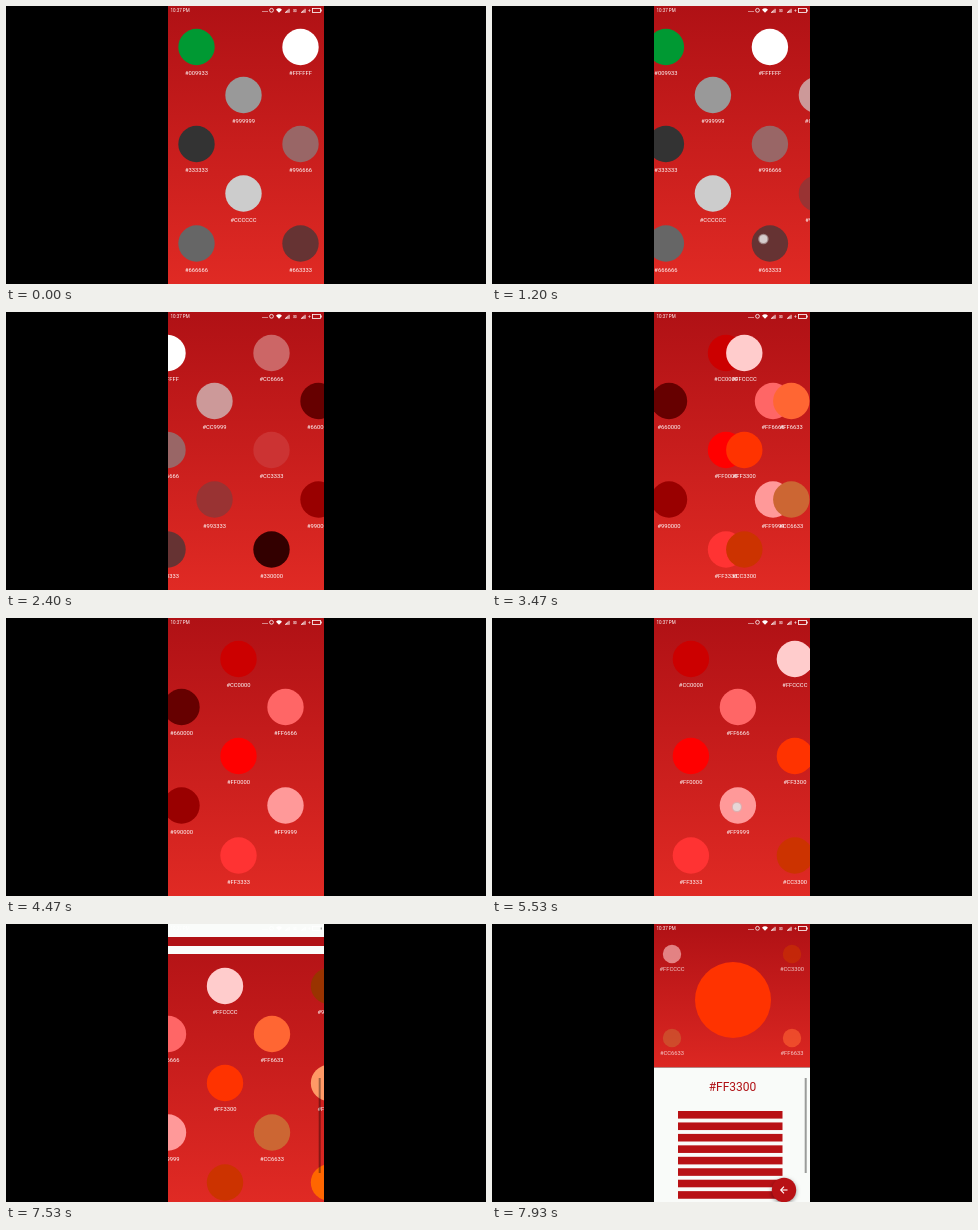
Recreate the animation shown at these times as an HTML page with a canvas. Size 480 px wide and 278 px high, loop 8000 ms.

```html
<!DOCTYPE html>
<html lang="en">
<head>
<meta charset="utf-8">
<title>Colour palette</title>
<style>
  html, body { margin: 0; width: 100%; height: 100%; overflow: hidden; background: #000; }
  canvas { display: block; width: 480px; height: 278px; }
</style>
</head>
<body>
<canvas id="stage"></canvas>
<script>
const LOOP = 8000, LEFT = 162, WIDTH = 156, HEIGHT = 278, PITCH = 104;
const canvas = document.getElementById('stage');
const ctx = canvas.getContext('2d');
const dpr = window.devicePixelRatio || 1;
canvas.width = 480 * dpr;
canvas.height = HEIGHT * dpr;

// Each group: three colours in the first column, two in the second.
const groups = [
  '009933 333333 666666 999999 CCCCCC',
  'FFFFFF 996666 663333 CC9999 993333',
  'CC6666 CC3333 330000 660000 990000',
  'CC0000 FF0000 FF3333 FF6666 FF9999',
  'FFCCCC FF3300 CC3300 FF6633 CC6633',
  '993300 FF9966 FF6600 CC9966 CC6600'
].map(row => row.split(' ').map(hex => '#' + hex));
const slots = [[28.5, 41], [28.5, 138], [28.5, 237.5], [75.5, 89], [75.5, 187.5]];
const enterAt = [-1e4, -1e4, 1368, 2680, 3143, 6050];
const SLIDE_TIME = 700;

// Scroll distance over time.
const scrollKeys = [
  [0, 0], [1070, 0], [1368, 52], [1670, 90], [2000, 122], [2400, 133], [2500, 133],
  [2680, 156], [2880, 215], [3143, 260], [3470, 268.5], [4050, 270], [5180, 270],
  [5530, 303.5], [5800, 343], [6050, 364], [6400, 385], [6780, 387.5], [LOOP, 387.5]
];

// Finger drags: start, end, x when scroll is zero, y.
const drags = [[1070, 1730, 288, 233], [2500, 2880, 419, 205], [5200, 5800, 548.5, 189]];

const clamp = v => Math.min(1, Math.max(0, v));
const ease = v => (1 - Math.cos(Math.PI * clamp(v))) / 2;
const ramp = (t, from, to) => clamp((t - from) / (to - from));
const mix = (a, b, k) => a + (b - a) * k;

function slope(i) {
  const [t, v] = scrollKeys[i];
  if (i === 0 || i === scrollKeys.length - 1) return 0;
  const [t0, v0] = scrollKeys[i - 1], [t1, v1] = scrollKeys[i + 1];
  const a = (v - v0) / (t - t0), b = (v1 - v) / (t1 - t);
  return a * b > 0 ? 2 * a * b / (a + b) : 0;
}

// Monotone cubic through the keys.
function scrollAt(t) {
  let i = 0;
  while (t > scrollKeys[i + 1][0]) i++;
  const [t0, v0] = scrollKeys[i], [t1, v1] = scrollKeys[i + 1];
  const d = t1 - t0, k = (t - t0) / d, q = k * k * (3 - 2 * k);
  return mix(v0, v1, q) + d * k * (1 - k) * ((1 - k) * slope(i) - k * slope(i + 1));
}

function rect(x, y, w, h, fill) {
  ctx.fillStyle = fill;
  ctx.fillRect(x, y, w, h);
}

function disc(x, y, r, fill) {
  ctx.fillStyle = fill;
  ctx.beginPath();
  ctx.arc(x, y, r, 0, 2 * Math.PI);
  ctx.fill();
}

function text(str, x, y, size, fill = '#fff', align = 'center') {
  ctx.font = `${size}px Roboto, "Open Sans", sans-serif`;
  ctx.textAlign = align;
  ctx.textBaseline = 'middle';
  ctx.fillStyle = fill;
  ctx.fillText(str, x, y);
}

function stroke(points, color, width) {
  ctx.strokeStyle = color;
  ctx.lineWidth = width;
  ctx.beginPath();
  points.forEach(([x, y]) => ctx.lineTo(x, y));
  ctx.stroke();
}

function backdrop(top, bottom, from = '#b01115', to = '#e02a24') {
  const g = ctx.createLinearGradient(0, top, 0, bottom);
  g.addColorStop(0, from);
  g.addColorStop(1, to);
  rect(LEFT, top, WIDTH, bottom - top, g);
}

function drawList(t, shift) {
  backdrop(0, HEIGHT);
  const scroll = scrollAt(t);
  groups.forEach((colors, n) => {
    if (t < enterAt[n]) return;
    const slide = WIDTH * (ease((t - enterAt[n]) / SLIDE_TIME) - 1);
    const left = LEFT + n * PITCH - scroll + slide;
    colors.forEach((color, i) => {
      const x = left + slots[i][0], y = slots[i][1] + shift;
      disc(x, y, 18.2, color);
      text(color, x, y + 26.3, 5.8);
    });
  });
}

function drawTopStrip(k) {
  ctx.save();
  ctx.translate(0, 30 * (k - 1));
  rect(LEFT, 0, WIDTH, 30, '#fafcfa');
  rect(LEFT, 13, WIDTH, 9, '#b01115');
  ctx.restore();
}

function drawDetail(t) {
  backdrop(0, 143.5, '#b01115', '#dc2722');
  rect(LEFT, 143.5, WIDTH, HEIGHT - 143.5, '#f9fbf9');
  text('#FF3300', 240.5, 163.5, 12, '#b01115');
  for (let i = 0; i < 8; i++) rect(186, 187 + i * 11.45, 104.5, 7.6, '#b81115');

  ctx.save();
  ctx.shadowColor = 'rgba(0,0,0,.4)';
  ctx.shadowBlur = 4 * dpr;
  ctx.shadowOffsetY = 1.5 * dpr;
  disc(292, 266, 12.2, '#b81115');
  ctx.restore();
  stroke([[295.5, 266], [289, 266]], '#fff', 1.1);
  stroke([[292, 262.7], [288.7, 266], [292, 269.3]], '#fff', 1.1);
}

function drawCorners(alpha) {
  const corners = [['#FFCCCC', 180, 30], ['#CC3300', 300, 30], ['#CC6633', 180, 114], ['#FF6633', 300, 114]];
  corners.forEach(([color, x, y]) => {
    ctx.globalAlpha = alpha;
    disc(x, y, 9.2, color);
    ctx.globalAlpha = Math.min(1, alpha * 1.3);
    text(color, x, y + 15.5, 5.8);
  });
  ctx.globalAlpha = 1;
}

function drawStatus(onWhite) {
  const c = '#fff';
  text('10:37 PM', 164.5, 4.8, 4.5, c, 'left');
  [257, 259, 261].forEach(x => rect(x - .5, 5, 1, 1, c));
  ctx.strokeStyle = c;
  ctx.lineWidth = .8;
  ctx.beginPath();
  ctx.arc(265.5, 4.3, 1.9, 0, 2 * Math.PI);
  ctx.stroke();
  ctx.fillStyle = c;
  ctx.beginPath();
  ctx.moveTo(273, 6.8);
  ctx.arc(273, 6.8, 4.3, -2.35, -.8);
  ctx.fill();
  [279, 295].forEach(x => {
    for (let i = 0; i < 4; i++) rect(x + i * 1.2, 5.8 - i, .9, 1 + i, c);
  });
  text('⊠', 289, 4.5, 4.5, c);
  text('+', 303.5, 4.5, 5, c);
  ctx.strokeStyle = c;
  ctx.strokeRect(306.5, 2.5, 8, 4);
  rect(314.7, 3.5, 1, 2, onWhite ? '#888' : c);
}

function drawTouch(t) {
  const spot = (x, y) => {
    disc(x, y, 5.2, 'rgba(200,190,190,.6)');
    disc(x, y, 4, 'rgba(232,228,228,.75)');
  };
  drags.forEach(([from, to, x, y]) => {
    if (t >= from && t < to) spot(x - scrollAt(t), y);
  });
  if (t >= 7130 && t < 7270) spot(222, 144.5);
}

function draw(t) {
  ctx.setTransform(dpr, 0, 0, dpr, 0, 0);
  rect(0, 0, 480, HEIGHT, '#000');
  ctx.save();
  ctx.beginPath();
  ctx.rect(LEFT, 0, WIDTH, HEIGHT);
  ctx.clip();

  const drop = ease(ramp(t, 7270, 7520));
  const open = ramp(t, 7540, 7700);
  if (open < 1) {
    ctx.save();
    if (drop > 0) {
      ctx.beginPath();
      ctx.rect(LEFT, 30 * drop, WIDTH, HEIGHT);
      ctx.clip();
    }
    drawList(t, 21 * drop);
    ctx.restore();
    if (drop > 0) drawTopStrip(drop);
  }
  if (open > 0) {
    ctx.globalAlpha = open;
    drawDetail(t);
    ctx.globalAlpha = 1;
    const k = ease(ramp(t, 7540, 7870));
    disc(mix(219, 241, k), mix(159, 76, k), mix(18.2, 38, k), '#FF3300');
    drawCorners(.6 * ramp(t, 7780, 7930));
  }
  if (t >= 7480) rect(312.7, 154, 2, 95, 'rgba(0,0,0,.38)');
  drawStatus(drop > .5 && open < .5);
  drawTouch(t);
  ctx.restore();
}

const start = performance.now();
function tick() {
  draw((performance.now() - start) % LOOP);
  requestAnimationFrame(tick);
}
tick();
</script>
</body>
</html>
```
